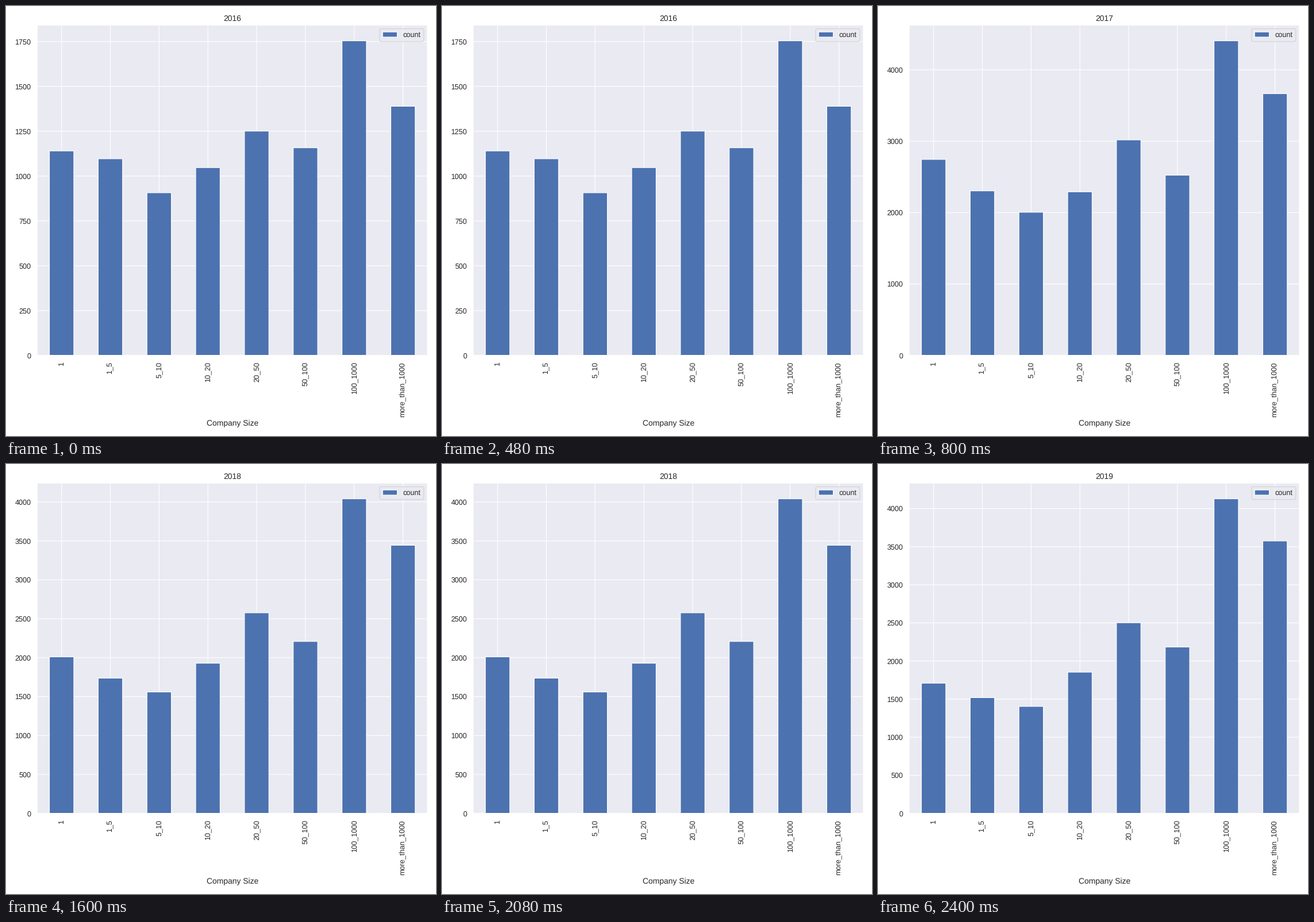
These frames come from a looping animation (748x748 px, 3.2 s). A matplotlib script:

```python
import numpy as np
import matplotlib.pyplot as plt
from matplotlib.animation import FuncAnimation

SIZE = 748
INK = "0.15"
BLUE = "#4C72B0"
PANEL = "#EAEAF2"
LEFT, RIGHT, TOP, BOTTOM = 54.3, 733.0, 33.2, 607.8

BOUNDS = [1, 5, 10, 20, 50, 100, 1000]
GROUPS = ["1", *(f"{a}_{b}" for a, b in zip(BOUNDS, BOUNDS[1:])), "more_than_1000"]

# Bar heights in percent of the tallest bar; other years blend between these
PROFILES = np.array([
    [65.0, 62.5, 51.7, 59.7, 71.3, 66.0, 100, 79.2],
    [62.3, 52.3, 45.5, 52.0, 68.5, 57.3, 100, 83.2],
    [41.4, 36.8, 34.0, 44.9, 60.6, 52.9, 100, 86.6],
])
FIRST_YEAR = 2016
PEAKS = [1754, 4405, 4040, 4128]
PHASES = [0, 1, 1.6, 2]

plt.rcParams.update({
    "font.family": "Liberation Sans",
    "font.size": 12,
    "text.color": INK,
    "text.hinting": "none",
    "axes.axisbelow": True,
    "path.snap": False,
})


def year_counts(i):
    low = min(int(PHASES[i]), len(PROFILES) - 2)
    blend = PHASES[i] - low
    share = (1 - blend) * PROFILES[low] + blend * PROFILES[low + 1]
    return PEAKS[i] * share / 100


fig = plt.figure(figsize=(9, 9), dpi=SIZE / 9, facecolor="white")
ax = fig.add_axes(
    [LEFT / SIZE, 1 - BOTTOM / SIZE, (RIGHT - LEFT) / SIZE, (BOTTOM - TOP) / SIZE],
    facecolor=PANEL,
)
ax.grid(True, color="white", linewidth=1, linestyle="-")
for spine in ax.spines.values():
    spine.set(color="white", linewidth=1.25)
ax.tick_params(length=0, pad=9.5, labelsize=11, labelcolor=INK)
ax.tick_params(axis="x", pad=10)

bars = ax.bar(range(len(GROUPS)), year_counts(0), width=0.5, color=BLUE,
              edgecolor="white", linewidth=1, label="count")
ax.set_xlim(-0.5, len(GROUPS) - 0.5)
ax.set_xticks(range(len(GROUPS)), GROUPS, rotation=90)
title = ax.set_title("", fontsize=12, pad=6)
fig.text((LEFT + RIGHT) / 2 / SIZE, 1 - 730 / SIZE, "Company Size",
         ha="center", va="baseline", fontsize=12)
ax.legend(loc="upper right", fontsize=11, facecolor=PANEL,
          edgecolor="0.8", framealpha=0.8)


def draw(i):
    title.set_text(str(FIRST_YEAR + i))
    for bar, count in zip(bars, year_counts(i)):
        bar.set_height(count)
    ax.set_ylim(0, PEAKS[i] * 1.05)
    return [title, *bars]


anim = FuncAnimation(fig, draw, frames=len(PEAKS), interval=800,
                     repeat=True, repeat_delay=0, blit=False)
plt.show()
```
